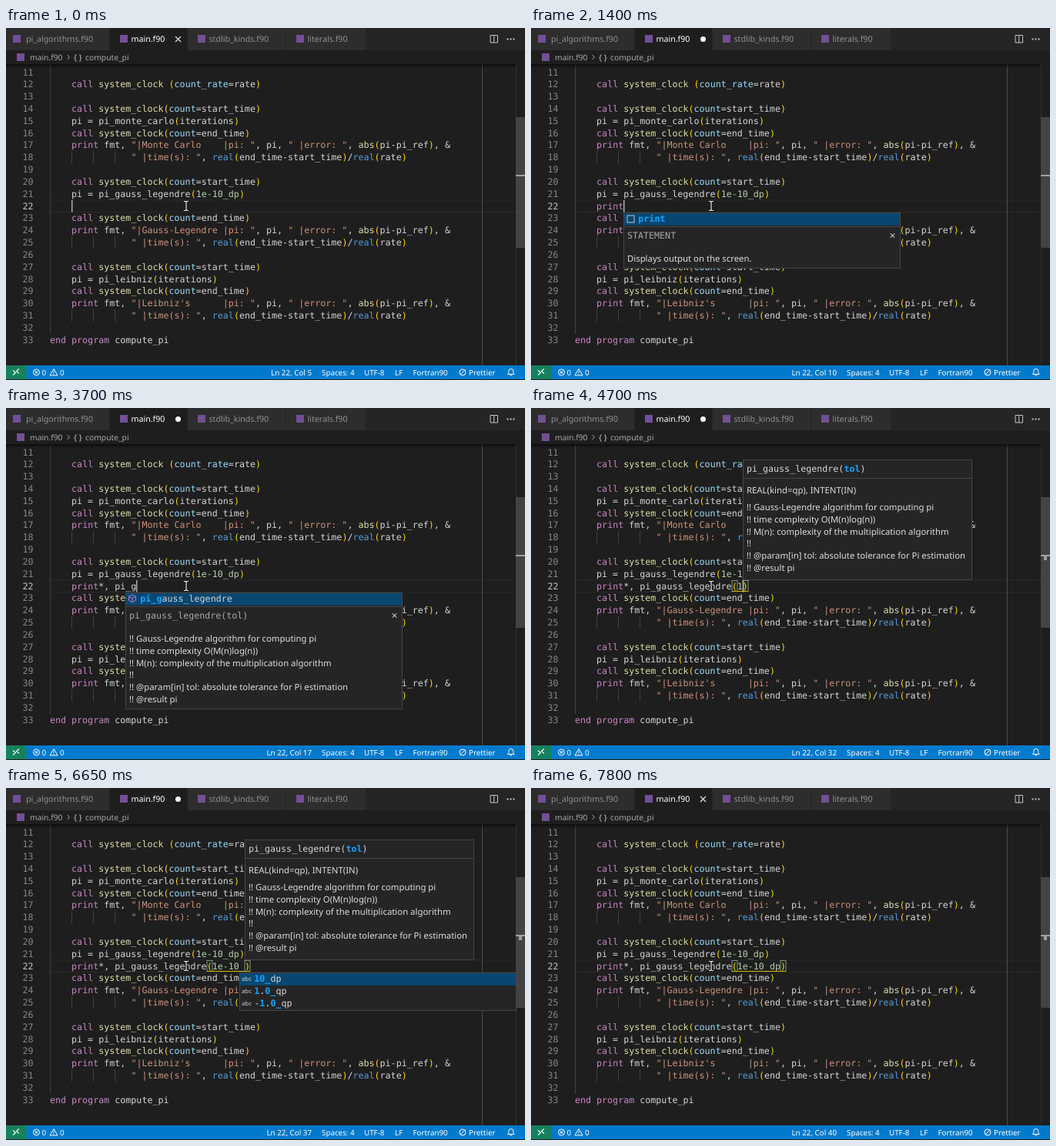
An HTML page with a canvas for the animation above (7900 ms loop, 674 by 458 pixels).

```html
<!DOCTYPE html>
<html lang="en">
<head>
<meta charset="utf-8">
<title>Editor completion</title>
<style>
html, body { margin: 0; width: 100%; height: 100%; overflow: hidden; background: #1e1e1e; }
canvas { display: block; }
</style>
</head>
<body>
<canvas id="stage" width="674" height="458"></canvas>
<script>
const ctx = document.getElementById('stage').getContext('2d');
const LOOP = 7900, SIZE = 11.67, CW = 7.026, LH = 15.833, LEFT = 57;
const MONO = '"DejaVu Sans Mono", monospace', SANS = '"Noto Sans", sans-serif';
const FG = '#d4d4d4', MATCH = '#18a3ff', EDGE = '#454545', PANEL = '#252526';

const colX = col => LEFT + (col - 1) * CW;
const lineY = n => 57.3 + (n - 11) * LH;

// Drawing helpers
function rect(x, y, w, h, color) {
  ctx.fillStyle = color;
  ctx.fillRect(x, y, w, h);
}
function frame(x, y, w, h, color) {
  ctx.strokeStyle = color;
  ctx.lineWidth = 1;
  ctx.strokeRect(x + .5, y + .5, w - 1, h - 1);
}
function path(d, color, width = 1) {
  ctx.strokeStyle = color;
  ctx.lineWidth = width;
  ctx.stroke(new Path2D(d));
}
function type(s, x, y, color, font, align = 'left') {
  ctx.font = font;
  ctx.fillStyle = color;
  ctx.textAlign = align;
  ctx.fillText(s, x, y);
}
const mono = (s, x, y, color, weight = '') => type(s, x, y + 4.2, color, `${weight} ${SIZE}px ${MONO}`);
const sans = (s, x, y, color, size = 11.35, align) => type(s, x, y + 3.9, color, `${size}px ${SANS}`, align);
const cross = (x, y, r, color) => path(`M${x - r} ${y - r}l${2 * r} ${2 * r}m0 ${-2 * r}l${-2 * r} ${2 * r}`, color, 1.1);
const ring = (x, y, r) => `M${x - r} ${y}a${r} ${r} 0 1 0 ${2 * r} 0a${r} ${r} 0 1 0 ${-2 * r} 0`;

// Program text, starting at line 11
const begin = '    call system_clock(count=start_time)';
const block = (name, call, extra = []) => [
  begin, '    pi = ' + call, ...extra, '    call system_clock(count=end_time)',
  `    print fmt, "|${name.padEnd(15)}|pi: ", pi, " |error: ", abs(pi-pi_ref), &`,
  ' '.repeat(15) + '" |time(s): ", real(end_time-start_time)/real(rate)', ''
];
const code = [
  '', '    call system_clock (count_rate=rate)', '',
  ...block('Monte Carlo', 'pi_monte_carlo(iterations)'),
  ...block('Gauss-Legendre', 'pi_gauss_legendre(1e-10_dp)', ['']),
  ...block("Leibniz's", 'pi_leibniz(iterations)'),
  'end program compute_pi'
];

const TOKENS = /("[^"]*"|\bcall\b|\bprint\b|\bend program\b|\bsystem_clock\b|\babs\b|\breal\b|\bcount\w*(?==)|\b\d\w*(?:-\w*)?|[()])/;
const COLORS = [
  [/^"/, '#ce9178'], [/^(call|print|end program)$/, '#c586c0'], [/^(system_clock|abs)$/, '#dcdcaa'],
  [/^real$/, '#569cd6'], [/^count\w*$/, '#9cdcfe'], [/^\d/, '#b5cea8'], [/^[()]$/, '#ffd700']
];
function codeLine(s, y) {
  let col = 1;
  for (const part of s.split(TOKENS)) {
    const rule = COLORS.find(([re]) => re.test(part));
    if (part.trim()) mono(part, colX(col), y, rule ? rule[1] : FG);
    col += part.length;
  }
}

// Completion lists: k keyword, v variable, f function, a plain word
const PI = ['v pi', 'f pi_gauss_legendre', 'f pi_leibniz', 'f pi_monte_carlo', 'v pi_ref', 'f parity', 'f precision'];
const DOC = [
  '!! Gauss-Legendre algorithm for computing pi', '!! time complexity O(M(n)log(n))',
  '!! M(n): complexity of the multiplication algorithm', '!!',
  '!! @param[in] tol: absolute tolerance for Pi estimation', '!! @result pi'
];
const STATEMENT = ['STATEMENT', 'Displays output on the screen.'];
const list = (col, query, items, info) => ({ col, query, items, info });
const printList = (n, items) => list(5 + n, 'print'.slice(0, n), items, STATEMENT);
const FN = 'print*, pi_gauss_legendre';
const call = arg => FN + '(' + arg;

// [start, text before cursor, { list, hint, closed, off }]
const states = [
  [0, ''], [100, '', { off: 1 }], [450, ''],
  [850, 'p'],
  [950, 'pr', { list: printList(2, ['k print', 'f precision', 'f product']) }],
  [1050, 'pri', { list: printList(3, ['k print', 'f precision']) }],
  [1200, 'prin', { list: printList(4, ['k print']) }],
  [1300, 'print', { list: printList(5, ['k print']) }],
  [1600, 'print*'], [1850, 'print*,'], [1950, 'print*, '],
  [2300, 'print*, p'],
  [2400, 'print*, pi', { list: list(15, 'pi', PI, ['REAL(qp)', 'REAL(qp)']) }],
  [2900, 'print*, pi_', { list: list(15, 'pi_', PI.slice(1, 5)) }],
  [3350, 'print*, pi_g', { list: list(15, 'pi_g', PI.slice(1, 2)) }],
  [3600, 'print*, pi_g', { list: list(15, 'pi_g', PI.slice(1, 2), ['pi_gauss_legendre(tol)', ...DOC]) }],
  [3900, FN],
  [4300, call(''), { hint: 1 }], [4700, call('1'), { hint: 1 }],
  [5100, call('1'), { hint: 1, off: 1 }],
  [5400, call('1e'), { hint: 1 }], [5550, call('1e-'), { hint: 1 }],
  [5850, call('1e-1'), { hint: 1 }], [5950, call('1e-10'), { hint: 1 }],
  ...[6250, 6650].map((t, i) => [t, call('1e-10_'),
    { hint: 1, off: i, list: list(36, '10_', ['a 10_dp', 'a 1.0_qp', 'a -1.0_qp']) }]),
  [6950, call('1e-10_dp'), { hint: 1 }],
  [7350, call('1e-10_dp)'), { closed: 1 }],
  [7650, call('1e-10_dp)'), { closed: 1, off: 1 }]
];

function header(dirty) {
  rect(0, 0, 674, 29, PANEL);
  const tabs = [[0, 135, 'pi_algorithms.f90'], [135, 236, 'main.f90'], [236, 364, 'stdlib_kinds.f90'], [364, 468, 'literals.f90']];
  tabs.forEach(([a, b, name], i) => {
    rect(a, 0, b - a - 1, 29, i === 1 ? '#1e1e1e' : '#2d2d2d');
    rect(a + (i ? 13 : 9), 9, 10, 10, '#734f96');
    sans(name, a + (i ? 27.5 : 26), 14, i === 1 ? '#fff' : '#919191', 10.65);
  });
  if (dirty) {
    ctx.fillStyle = '#fff';
    ctx.beginPath();
    ctx.arc(223.5, 14.5, 3.5, 0, 7);
    ctx.fill();
  } else cross(223.5, 14.5, 3.5, '#e8e8e8');
  path('M629 9.5h9.500v9.500h-9.500zM633.750 9.500v9.500', '#c5c5c5');
  for (let i = 0; i < 3; i++) rect(650.5 + i * 4, 13.5, 2, 2, '#c5c5c5');
  rect(0, 29, 674, 18, '#1e1e1e');
  rect(14, 33, 10, 10, '#734f96');
  sans('main.f90', 31, 38, '#a9a9a9', 10.3);
  path('M79.500 35l3 3-3 3', '#a9a9a9');
  sans('{ }', 88, 38, '#c5c5c5', 10.5);
  sans('compute_pi', 103, 38, '#a9a9a9', 10.3);
  const shade = ctx.createLinearGradient(0, 47, 0, 52);
  shade.addColorStop(0, 'rgba(0,0,0,.6)');
  shade.addColorStop(1, 'rgba(0,0,0,0)');
  rect(0, 47, 662, 5, shade);
}

function editor(text, closer, open, close) {
  rect(LEFT, 223.5, 605, 1, '#292929');
  rect(LEFT, 239, 605, 1, '#292929');
  rect(618, 47, 1, 392, '#4a4a4a');
  rect(LEFT, 47, 1, 351, '#404040');
  code.forEach((s, i) => {
    const n = 11 + i, y = lineY(n);
    type(n, 35.5, y + 4.2, n === 22 ? '#c6c6c6' : '#858585', `${SIZE}px ${MONO}`, 'right');
    if (s.startsWith(' '.repeat(15)))
      for (let col = 5; col < 15; col += 4) rect(Math.round(colX(col)), y - 8, 1, LH, '#404040');
    if (n !== 22) codeLine(s, y);
  });
  if (open) {
    for (const col of [open, close]) {
      rect(colX(col), 224, CW, 15, 'rgba(0,100,0,.15)');
      frame(Math.round(colX(col)) - .5, 224, 8, 15, '#888');
    }
    // underline of the active bracket pair
    rect(colX(open), 238, (close - open + 1) * CW, 1, '#d4b300');
  }
  codeLine('    ' + text + closer, lineY(22));
  rect(662, 47, 1, 392, '#303030');
  rect(662, 116, 12, 170, '#434343');
  rect(662, 191, 12, 2, '#a0a0a0');
  if (open) rect(666, 193, 4, 5, '#a0a0a0');
}

function icon(kind, x, y) {
  if (kind === 'k') {
    frame(x - 4.5, y - 4.5, 10, 10, '#c5c5c5');
  } else if (kind === 'v') {
    path(`M${x - 3} ${y - 3}h-2.500v7h2.500M${x + 3} ${y - 3}h2.500v7h-2.500M${x - 2.5} ${y}l2.500-1.500 2.500 1-2.500 2zv2l2.500 1 2.500-2v-2`, '#75beff', .9);
  } else if (kind === 'f') {
    path(`M${x} ${y - 5}l4.500 2.300v5l-4.500 2.700-4.500-2.700v-5zM${x - 4.5} ${y - 2.7}l4.500 2.300 4.500-2.300M${x} ${y - .4}v5.400`, '#b180d7');
  } else sans('abc', x - 6, y - .8, '#d4d4d4', 7.8);
}

function suggest({ col, query, items, info }) {
  const x = Math.round(colX(col)), y = 240, w = 360;
  const listH = Math.round(items.length * LH + 3);
  rect(x, y, w, listH, PANEL);
  rect(x, y + 1, w, LH, '#094771');
  items.forEach((item, i) => {
    const cy = y + 8 + i * LH, label = item.slice(2);
    icon(item[0], x + 9, cy);
    let hit = 0;
    [...label].forEach((c, j) => {
      const on = c === query[hit];
      if (on) hit++;
      mono(c, x + 19.3 + j * CW, cy, on ? MATCH : FG, on ? 'bold' : '');
    });
  });
  frame(x, y, w, listH, EDGE);
  if (!info) return;
  const top = y + listH - 1, lines = info.slice(1);
  const h = 55 + (lines.length - 1) * LH;
  rect(x, top, w, h, PANEL);
  frame(x, top, w, h, EDGE);
  mono(info[0], x + 5, top + 11.5, '#a8a8a8');
  cross(x + 349.5, top + 12, 2.7, '#c5c5c5');
  lines.forEach((s, i) => sans(s, x + 5, top + 42 + i * LH, '#dcdcdc'));
}

function hint(col) {
  const x = Math.round(colX(col)), head = 'pi_gauss_legendre(';
  rect(x, 67, 298, 157, PANEL);
  frame(x, 67, 298, 157, EDGE);
  rect(x, 91, 298, 1, EDGE);
  mono(head, x + 5, 79, FG);
  mono('tol', x + 5 + 18 * CW, 79, MATCH, 'bold');
  mono(')', x + 5 + 21 * CW, 79, FG);
  sans('REAL(kind=qp), INTENT(IN)', x + 5, 107, '#dcdcdc');
  DOC.forEach((s, i) => sans(s, x + 5, 129 + i * LH, '#dcdcdc'));
}

function statusBar(col) {
  const put = (s, x, align) => sans(s, x, 447.7, '#fff', 9.8, align);
  rect(0, 439, 674, 18, '#007acc');
  rect(0, 439, 26.5, 18, '#16825d');
  path('M9 445.500l3.500 3-3.500 3M17 443.500l-3.500 3 3.500 3', '#fff', 1.1);
  path(ring(39.5, 448, 4), '#fff');
  cross(39.5, 448, 1.7, '#fff');
  put('0', 46.5);
  path('M62 443.500l5 8.500h-10zM62 446.500v2.500m0 1v1', '#fff');
  put('0', 70);
  put('Ln 22, Col ' + col, 397, 'right');
  put('Spaces: 4', 410);
  put('UTF-8', 465);
  put('LF', 505);
  put('Fortran90', 528.5);
  path(ring(593, 448, 4) + 'M590.200 450.800l5.600-5.600', '#fff');
  put('Prettier', 601);
  path('M651.500 450.500h8.500l-1.200-2v-2a3 3 0 0 0-6 0v2zM654.500 452h2.500', '#fff');
}

function ibeam() {
  const d = 'M231 225.500h2l1 1 1-1h2M234 226.500v10M231 237.500h2l1-1 1 1h2';
  path(d, '#111', 2.6);
  path(d, '#fff', 1.1);
}

function draw() {
  const t = performance.now() % LOOP;
  const [, text, opt = {}] = states.findLast(s => s[0] <= t);
  const cursor = 5 + text.length;
  const open = text.includes('(') ? 5 + text.indexOf('(') : 0;
  const closer = open && !opt.closed ? ')' : '';
  ctx.textRendering = 'geometricPrecision';
  rect(0, 0, 674, 458, '#1e1e1e');
  editor(text, closer, open, opt.closed ? cursor - 1 : cursor);
  header(t >= 850 && t < 7650);
  if (!opt.off) rect(Math.round(colX(cursor)), 224, 1.5, 15.5, '#aeafad');
  if (opt.list) suggest(opt.list);
  if (opt.hint) hint(cursor);
  statusBar(cursor);
  ibeam();
  requestAnimationFrame(draw);
}
draw();
</script>
</body>
</html>
```
